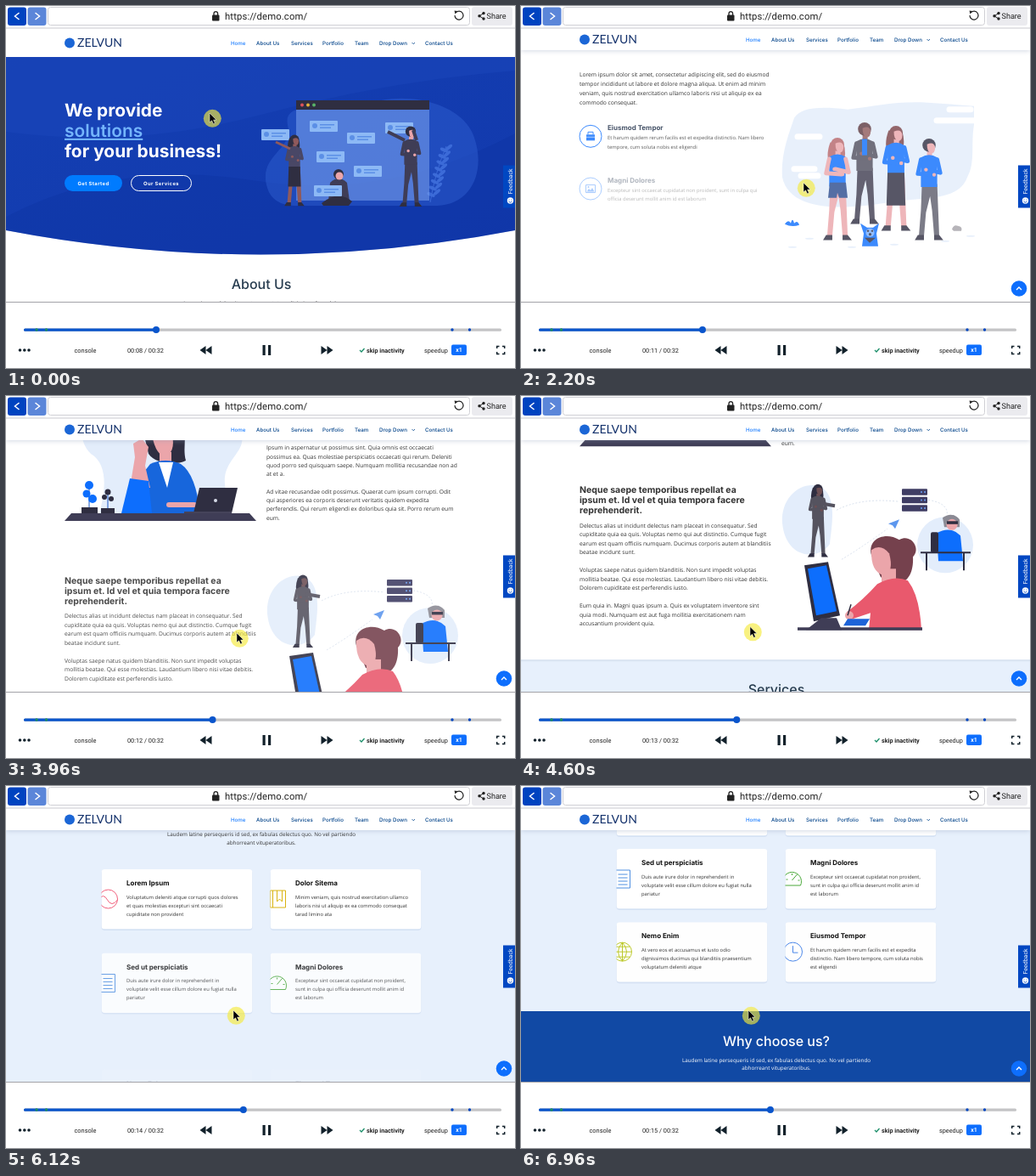
Recreate the animation shown at these times as an HTML page. Size 600 by 426 pixels, loop 7000 ms.

```html
<!DOCTYPE html>
<html lang="en">
<head>
<meta charset="utf-8">
<title>Session replay</title>
<style>
html, body { margin: 0; width: 100%; height: 100%; overflow: hidden; background: #fff; }
svg { display: block; }
body > svg { width: 600px; height: 426px; text-rendering: geometricPrecision; }
</style>
</head>
<body>
<script>
const LOOP = 7000, STEP = 40;
const DARK = '#2f2e41', BLUE = '#0d6efd', DEEP = '#0047c2', SKIN = '#eba5aa', BROWN = '#8f5a5c', PALE = '#e3edfb';

// Shape helpers; text is placed by the middle of its first line
const rect = (x, y, w, h, fill, more = '') => `<rect x="${x}" y="${y}" width="${w}" height="${h}" fill="${fill}" ${more}/>`;
const circle = (x, y, r, fill, more = '') => `<circle cx="${x}" cy="${y}" r="${r}" fill="${fill}" ${more}/>`;
const path = (d, fill, more = '') => `<path d="${d}" fill="${fill}" ${more}/>`;
const line = (d, color, width = 1, more = '') => path(d, 'none', `stroke="${color}" stroke-width="${width}" ${more}`);
const text = (x, y, str, size, { font = 'Open Sans', weight = 400, fill = '#333', anchor = 'start', lead = 10.2, more = '' } = {}) =>
  `<text font-family="'${font}', sans-serif" font-size="${size}" font-weight="${weight}" fill="${fill}" text-anchor="${anchor}" ${more}>` +
  str.split('|').map((s, i) => `<tspan x="${x}" y="${y + size * .35 + i * lead}">${s}</tspan>`).join('') + '</text>';
const head = (x, y, str, size, opt) => text(x, y, str, size, { font: 'Inter', weight: 700, ...opt });
const ui = (x, y, str, size, opt) => text(x, y, str, size, { font: 'Roboto', fill: '#222', ...opt });
const group = (dy, body, id = '') => `<g transform="translate(0 ${dy})"><g id="${id}">${body}</g></g>`;

// Standing figure with folded arms, 100 units tall before scaling
const person = (x, y, h, { hair = DARK, skin = SKIN, top = BLUE, legs = skin, arms = top, skirt, long }) =>
  `<g transform="translate(${x} ${y}) scale(${h / 100})">` +
  (long ? path('M-7 4Q-12 18 -7 25H6Q9 14 6 5Z', hair) : '') +
  path('M-7 44H8L9 70L10 95H5L3 70L1 56L-3 72L-5 95H-10L-8 70Z', legs) +
  path('M-11 94H-5V99H-14ZM5 94H10L14 99H5Z', DARK) + path('M-2 10H3V20H-2Z', skin) +
  path('M-8 18Q0 13 8 18L8 47H-8Z', top) +
  line('M-8 20L-11 34L4 35M8 20L11 33L-2 30', arms, 4, 'stroke-linejoin="round" stroke-linecap="round"') +
  circle(5, 35, 1.8, skin) + circle(-3, 30, 1.8, skin) +
  (skirt ? path(`M-8 44H8L9 ${skirt}H-9Z`, DARK) : '') +
  circle(0, 6, 6.5, hair) + path('M-2 5Q5 2 6 8Q6 14 2 14Q-2 13 -2 5Z', skin) + '</g>';

const hero = () => {
  const note = (x, y) => rect(x, y, 33, 13, '#8db9f5', 'rx="1"') + circle(x + 6, y + 6, 3, '#5b8fe6') +
    rect(x + 12, y + 4, 17, 1.5, '#5b8fe6') + rect(x + 12, y + 7.5, 13, 1.5, '#5b8fe6');
  const leaf = (x, y, turn) => `<ellipse cx="${x}" cy="${y}" rx="5" ry="2" fill="#3c6bd8" transform="rotate(${turn} ${x} ${y})"/>`;
  const leaves = [0, 1, 2, 3, 4, 5, 6, 7].map(i => leaf(501 + i * 2.2, 222 - i * 7.5, 25) + leaf(508 + i * 2, 219 - i * 7.5, -40)).join('');
  return path('M0 0H600V264Q300 321 0 264Z', 'url(#sky)') +
    path('M0 148Q150 168 300 128T600 76V0H0Z', '#1a46bb', 'opacity=".55"') +
    path('M0 248Q130 180 290 205T600 150V264Q300 321 0 264Z', '#0b2f9c', 'opacity=".3"') +
    path('M308 214C296 175 340 170 332 140C326 108 380 126 420 118C470 96 540 115 552 155C566 195 548 236 505 235H340Q314 234 308 214Z', '#2f5fd0', 'opacity=".5"') +
    leaves + line('M500 231Q506 195 519 165', '#3c6bd8') +
    rect(342, 111, 157, 118, '#7da2ee', 'opacity=".55"') + rect(342, 111, 157, 11, DARK) +
    circle(349, 116.5, 2, '#e0525a') + circle(356, 116.5, 2, '#e6b23a') + circle(363, 116.5, 2, '#58b368') +
    [[301, 145], [358, 135], [402, 149], [447, 137], [366, 171], [410, 188]].map(p => note(...p)).join('') +
    person(340, 152, 84, { skin: BROWN, top: '#494766', skirt: 72, long: true }) + line('M335 168L318 160', BROWN, 3) +
    person(477, 142, 95, { top: '#3f3d56', legs: '#3f3d56' }) + line('M470 158L450 148M484 158L480 146', '#3f3d56', 4) +
    path('M382 208Q392 198 402 208L405 230H380Z', '#3f3d56') +
    path('M372 232Q392 216 408 230L404 235H374Z', DARK) + circle(392, 198, 6, DARK) + circle(393, 200, 4.5, SKIN) +
    note(363, 211) +
    head(69, 122.5, 'We provide', 20.9, { fill: '#fff' }) +
    head(69, 146.5, 'solutions', 20.9, { weight: 600, fill: '#74b5fc', more: 'text-decoration="underline"' }) +
    head(69, 170.5, 'for your business!', 20.9, { fill: '#fff' }) +
    rect(69, 199, 68, 19, '#007bff', 'rx="9.5"') + rect(147.5, 199.5, 71, 18, 'none', 'rx="9" stroke="#fff"') +
    head(103, 208.5, 'Get Started', 5.9, { fill: '#fff', anchor: 'middle', more: 'letter-spacing=".4"' }) +
    head(183, 208.5, 'Our Services', 5.9, { fill: '#fff', anchor: 'middle', more: 'letter-spacing=".4"' });
};

const title = (y, str, fill = '#283d50') => head(301, y, str, 16, { weight: 500, fill, anchor: 'middle' });
const lead = (y, str, fill = '#333') => text(301, y, str, 6.3, { fill, anchor: 'middle', lead: 9.5 });
const LAUDEM = 'Laudem latine persequeris id sed, ex fabulas delectus quo. No vel partiendo|abhorreant vituperatoribus.';

const feature = (y, name, body, icon) =>
  circle(82, y + 10, 13, '#fff', `stroke="${BLUE}"`) + `<g transform="translate(82 ${y + 10})">${icon}</g>` +
  head(102, y, name, 8, { fill: '#1b2b45' }) + text(102, y + 12, body, 5.86);

const ICONS = {
  bag: path('M-5 -2H5V5H-5Z', BLUE) + line('M-3 -2V-5H3V-2', BLUE) + line('M-5 1H5', '#fff', .6),
  image: line('M-5.5 -4.5H5.5V4.5H-5.5Z', BLUE) + path('M-4.5 3.5L-2 0L0 2L2 -1L4.5 3.5Z', BLUE) + circle(-2.5, -2, 1, BLUE),
  chart: line('M-6 -5V5H6', BLUE) + line('M-3 4V0M0 4V-4M3 4V-2M5 4V-5', BLUE, 1.6)
};

const team = () =>
  path('M308 168C306 140 316 116 322 98C330 86 350 84 385 88C420 84 440 78 480 80L534 84V106C530 130 536 150 526 168C515 198 470 190 430 198C390 204 318 212 308 168Z', PALE) +
  line('M326 120H352M322 158H346M490 101H534M505 88H530M330 166H350', '#fff', 7, 'stroke-linecap="round"') +
  person(373, 122, 121, { hair: '#b5666b', legs: SKIN, arms: SKIN, long: true }) + path('M364 174H383L385 192H375L373 186L372 192H362Z', '#2b4c8f') +
  person(405, 104, 120, { hair: '#5d3a42', skin: BROWN, top: '#4f4e5e', legs: '#3f3d50' }) + path('M402 123H408V142H402Z', BLUE) +
  person(442, 108, 124, { hair: '#7a4248', skirt: 75, long: true }) +
  person(481, 123, 120, { legs: '#5c5b6b' }) +
  path('M402 249L404 234L400 222L408 227H415L422 222L419 234L421 249Z', BLUE) + circle(411.5, 233, 5, '#78aefc') +
  circle(409, 231, 1.2, DARK) + circle(414, 231, 1.2, DARK) + circle(411.5, 235, 1.6, DARK) + path('M405 239H418L411 245Z', DARK) +
  path('M311 223Q315 217 318 222Q320 214 322 222Q326 218 328 224Q319 227 311 223Z', BLUE) +
  path('M508 229Q510 223 515 225Q521 226 519 231H510Z', '#a5a3a9') +
  [[340, 240], [390, 250], [440, 247], [500, 243], [530, 237], [320, 250]].map(([x, y]) => `<ellipse cx="${x}" cy="${y}" rx="5" ry="1" fill="${PALE}"/>`).join('');

const desk = () =>
  path('M88 40C84 20 130 28 165 30C200 18 268 22 278 45C282 65 262 72 258 95C256 115 270 138 250 138H110C118 110 120 80 100 68C92 60 90 52 88 40Z', PALE) +
  path('M163 47C160 26 186 20 203 30C217 42 207 58 212 76C200 82 176 80 168 68Z', DARK) +
  path('M172 42Q187 34 196 46Q200 66 187 72Q174 66 172 42Z', SKIN) + path('M181 66H195V86H181Z', SKIN) +
  path('M170 80Q188 72 206 80Q224 92 229 139H148L156 98Z', '#1766dc') + path('M180 78H197L190 108Z', '#fff') +
  path('M146 108L152 72L150 56L160 50L168 60L164 82L170 108Z', SKIN) + path('M146 97L168 100L172 138H136Z', BLUE) +
  line('M192 128H222', SKIN, 6, 'stroke-linecap="round"') +
  path('M228 108H273L266 138H221Z', DARK) + path('M210 136H266V140H210Z', '#45435a') + circle(247, 123, 2, '#d7dbe8') +
  path('M89 131H108V140H89ZM112 132H128V140H112Z', DARK) +
  line('M98 131V106M120 132V115', '#1b56c4') + circle(98, 105, 5, BLUE) + circle(95, 115, 4.5, BLUE) + circle(102, 121, 5, BLUE) +
  circle(120, 113, 3.5, DARK) + circle(116, 119, 3, DARK) + circle(124, 121, 3, DARK) +
  path('M77 138H287L295 147H69Z', '#3f3d56');

const network = () =>
  path('M308 255C306 225 330 205 352 212C374 222 366 260 364 280C350 300 312 298 308 255Z', PALE) +
  person(350, 210, 86, { skin: '#6d5055', top: '#55535f', legs: '#55535f', long: true }) + line('M353 232L370 235', '#55535f', 4) +
  line('M372 240Q400 225 446 230M480 228Q505 232 502 247M378 298Q400 285 432 262', '#c9d4e6', .7, 'stroke-dasharray="2 2"') +
  [215, 224.5, 234].map(y => rect(449, y, 30, 7.5, '#3f3d63', 'rx="1"') + circle(472, y + 3.7, 1, '#6ba0f7') + circle(476, y + 3.7, 1, '#6ba0f7')).join('') +
  path('M433 256L446 251L441 262L438 258Z', '#5d97ee') +
  circle(500, 281, 33, PALE) + path('M490 267Q506 258 518 270L521 300H492Z', BLUE) +
  path('M497 249Q508 241 517 251V260H499Z', '#8b8a94') + circle(508, 257, 6.5, SKIN) + rect(502, 253, 13, 3.5, DARK) +
  rect(483, 266, 9, 24, DARK, 'rx="2"') + line('M471 290H530M478 291V311M522 291V311', DARK, 2);

const artist = () =>
  path('M334 104L362 100L376 163L345 170Z', DARK) + path('M338 108L360 104L372 158L348 163Z', BLUE) +
  path('M354 166H372L378 180H336Z', '#3f3d56') +
  path('M413 92C408 72 430 64 446 74C460 66 472 85 462 94C463 112 456 124 446 124L424 118Z', '#75414d') +
  path('M413 86Q424 78 434 90Q440 112 428 116Q412 112 413 86Z', SKIN) + path('M425 108H442V128H425Z', SKIN) +
  path('M420 126Q440 115 456 122Q470 140 472 180H410L412 160L388 168L384 159Q404 144 420 126Z', '#e9596d') +
  circle(387, 163, 5, SKIN) + line('M385 163L389 150', DARK, 1.5) +
  path('M385 167H411L406 175H380Z', '#1d63d8') + rect(326, 177, 147, 3.5, '#3f3d56');

const CARD_ICONS = [
  ['#f0607c', 'M19 35A11 11 0 1 1 -3 35A11 11 0 1 1 19 35M-3 36Q2 27 7 36T19 36'],
  ['#d9b310', 'M0 25H18V45H0ZM8 25V38L11 35L14 38V25M3 25V45'],
  ['#4f8fe0', 'M-3 25H16V46H-3ZM2 30H13M2 34H13M2 38H13M2 42H13'],
  ['#4aa83a', 'M-2 43A11 11 0 1 1 18 43ZM8 37L14 30M1 36H3M8 29V31M15 37H17'],
  ['#bcc82a', 'M18 35A11 11 0 1 1 -4 35A11 11 0 1 1 18 35M-4 35H18M7 24V46M-2 29H16M-2 41H16M7 24Q-3 35 7 46Q17 35 7 24'],
  ['#4a86e8', 'M20 35A11 11 0 1 1 -2 35A11 11 0 1 1 20 35M9 28V36H15']
];
const card = (i, name, body) => {
  const x = i % 2 ? 311.5 : 112.5, y = 98 + (i >> 1) * 86;
  return rect(x, y + 1, 178, 71, '#9fb8dc', 'rx="4" opacity=".25"') +
    `<svg x="${x}" y="${y}" width="178" height="70.5">` + rect(0, 0, 178, 70.5, '#fff', 'rx="4"') +
    line(CARD_ICONS[i][1], CARD_ICONS[i][0]) +
    head(29.5, 16.5, name, 8, { fill: '#111' }) + text(29.5, 32.5, body, 5.86) + '</svg>';
};

const page = () =>
  group(0, hero() + title(327, 'About Us') + lead(350, 'Lorem ipsum dolor sit amet, consectetur adipiscing elit, sed do|eiusmod tempor incididunt ut labore.')) +
  group(320, text(69, 77, 'Lorem ipsum dolor sit amet, consectetur adipiscing elit, sed do eiusmod|tempor incididunt ut labore et dolore magna aliqua. Ut enim ad minim|veniam, quis nostrud exercitation ullamco laboris nisi ut aliquip ex ea|commodo consequat.', 6.7, { lead: 11 })) +
  group(320, team(), 'team') +
  group(320, feature(132, 'Eiusmod Tempor', 'Et harum quidem rerum facilis est et expedita distinctio. Nam libero|tempore, cum soluta nobis est eligendi', ICONS.bag), 'feat1') +
  group(320, feature(176, 'Magni Dolores', 'Excepteur sint occaecat cupidatat non proident, sunt in culpa qui|officia deserunt mollit anim id est laborum', ICONS.image), 'feat2') +
  group(320, feature(221, 'Dolor Sitema', 'Minim veniam, quis nostrud exercitation ullamco laboris nisi ut aliquip|ex ea commodo consequat tarad limino ata', ICONS.chart), 'feat3') +
  group(583, desk() +
    head(307, 30, 'Voluptatem dignissimos provident quasi|corporis voluptates sit assumenda.', 10.5, { lead: 12 }) +
    text(307, 61, 'Ipsum in aspernatur ut possimus sint. Quia omnis est occaecati|possimus ea. Quas molestiae perspiciatis occaecati qui rerum. Deleniti|quod porro sed quisquam saepe. Numquam mollitia recusandae non ad|at et a.||Ad vitae recusandae odit possimus. Quaerat cum ipsum corrupti. Odit|qui asperiores ea corporis deserunt veritatis quidem expedita|perferendis. Qui rerum eligendi ex doloribus quia sit. Porro rerum eum|eum.', 6.7, { lead: 10.3 }), 'desk') +
  group(565, network() + group(201, artist()) +
    head(69, 216, 'Neque saepe temporibus repellat ea|ipsum et. Id vel et quia tempora facere|reprehenderit.', 10.5, { lead: 12 }) +
    text(69, 258, 'Delectus alias ut incidunt delectus nam placeat in consequatur. Sed|cupiditate quia ea quis. Voluptas nemo qui aut distinctio. Cumque fugit|earum est quam officiis numquam. Ducimus corporis autem at blanditiis|beatae incidunt sunt.||Voluptas saepe natus quidem blanditiis. Non sunt impedit voluptas|mollitia beatae. Qui esse molestias. Laudantium libero nisi vitae debitis.|Dolorem cupiditate est perferendis iusto.||Eum quia in. Magni quas ipsum a. Quis ex voluptatem inventore sint|quia modi. Numquam est aut fuga mollitia exercitationem nam|accusantium provident quia.', 6.7, { lead: 10.5 }), 'network') +
  group(766, rect(0, 215, 600, 375, '#e7f0fc') + rect(0, 215, 600, 2, '#d9e3f1') + title(250, 'Services') + lead(272, LAUDEM)) +
  group(981, card(0, 'Lorem Ipsum', 'Voluptatum deleniti atque corrupti quos dolores|et quas molestias excepturi sint occaecati|cupiditate non provident') +
    card(1, 'Dolor Sitema', 'Minim veniam, quis nostrud exercitation ullamco|laboris nisi ut aliquip ex ea commodo consequat|tarad limino ata'), 'row1') +
  group(981, card(2, 'Sed ut perspiciatis', 'Duis aute irure dolor in reprehenderit in|voluptate velit esse cillum dolore eu fugiat nulla|pariatur') +
    card(3, 'Magni Dolores', 'Excepteur sint occaecat cupidatat non proident,|sunt in culpa qui officia deserunt mollit anim id|est laborum'), 'row2') +
  group(981, card(4, 'Nemo Enim', 'At vero eos et accusamus et iusto odio|dignissimos ducimus qui blanditiis praesentium|voluptatum deleniti atque') +
    card(5, 'Eiusmod Tempor', 'Et harum quidem rerum facilis est et expedita|distinctio. Nam libero tempore, cum soluta nobis|est eligendi'), 'row3') +
  group(1091, rect(0, 265, 600, 200, '#1149a4') + title(300, 'Why choose us?', '#fff') + lead(322.5, LAUDEM, '#fff'));

const NAV = [[265, 'Home'], [295, 'About Us'], [336, 'Services'], [373, 'Portfolio'], [411, 'Team'], [440, 'Drop Down'], [494, 'Contact Us']];
const header = () =>
  rect(0, -30, 600, 30, '#8a9ab5', 'id="shade" filter="url(#soft)"') + rect(0, -40, 600, 40, '#fff') +
  '<g id="nav">' + circle(75, 0, 6, '#1b66d6') + text(84, 0, 'ZELVUN', 14, { font: 'Lato', fill: '#12306b' }) +
  NAV.map(([x, s], i) => head(x, 0, s, 6.2, { weight: 500, fill: i ? '#004289' : '#1b7dff' })).join('') +
  line('M478.5 -.5L480.3 1.3L482 -.5', '#004289', .8) + '</g>';

const topBar = () =>
  rect(0, 0, 600, 26, '#fff') + rect(2, 1.5, 22, 21.5, '#0043c0', 'rx="3"') + rect(25.5, 1.5, 22, 21.5, '#5b86d9', 'rx="3"') +
  line('M15.5 8L10.5 12L15.5 16M34.5 8L39.5 12L34.5 16', '#fff', 1.5) +
  rect(49.5, 1.5, 497, 21, '#fff', 'rx="3" stroke="#cfcfd4"') + rect(243, 10.5, 8.5, 7, '#222', 'rx="1"') + line('M245 11V9A2.3 2.3 0 0 1 249.6 9V11', '#222', 1.3) +
  ui(258, 12, 'https://demo.com/', 11.3, { more: 'letter-spacing=".12"' }) +
  line('M530.3 7.7A5 5 0 1 1 529 11', '#222', 1.2) + path('M528.5 5.5L532.5 6L529.5 9.5Z', '#222') +
  rect(549, 1, 48, 22, '#ebebef', 'rx="3"') + line('M563 8.5L558 11.8L563 15', '#222') +
  circle(558, 11.8, 1.7, '#222') + circle(563, 8.5, 1.7, '#222') + circle(563, 15, 1.7, '#222') + ui(566.5, 12, 'Share', 9.1) +
  rect(0, 25.5, 600, 1, '#c9c9cf');

const controls = () =>
  rect(0, 348, 600, 78, '#fff') + rect(0, 348, 600, 1, '#a3a3a8') +
  rect(21, 379.5, 563, 3.2, '#c4c4c6', 'rx="1.5"') + rect(21, 379.5, 0, 3.2, '#0a55cc', 'rx="1.5" id="played"') +
  circle(36, 381, 1.7, '#1f8f5f') + circle(47.5, 381, 1.7, '#1f8f5f') + circle(526, 381, 1.7, DEEP) + circle(546.5, 381, 1.7, DEEP) +
  circle(0, 381, 4, '#0a55cc', 'id="thumb"') +
  [16.5, 21.8, 27].map(x => circle(x, 405, 1.8, '#12212b')).join('') +
  ui(80.5, 405, 'console', 7.4) + '<g id="clock">' + ui(143, 405, '00:08 / 00:32', 7.3) + '</g>' +
  path('M228.5 405L235.5 400V410ZM235.5 405L242.5 400V410ZM385.5 405L378.5 400V410ZM378.5 405L371.5 400V410ZM302.5 399H305.7V411H302.5ZM309 399H312.2V411H309Z', '#12212b') +
  line('M417 405L419 407L422.5 403', '#1c8f6a', 1.3) + ui(425, 405, 'skip inactivity', 7.2, { weight: 700 }) +
  ui(493, 405, 'speedup', 7.3) + rect(525, 398.5, 18, 12.5, BLUE, 'rx="2"') + ui(534, 405, 'x1', 7, { weight: 700, fill: '#fff', anchor: 'middle' }) +
  line('M578.7 403V400.5H581.5M585 400.5H587.7V403M587.7 407V409.5H585M581.5 409.5H578.7V407', '#12212b', 1.5);

const widgets = () =>
  `<g id="up">${circle(587, 332.5, 9.3, BLUE)}${line('M584 334L587 331L590 334', '#fff', 1.4)}</g>` +
  rect(586, 187.5, 14, 50, DEEP) + `<g transform="translate(594.5 221.5) rotate(-90)">${ui(0, 0, 'Feedback', 7, { fill: '#fff' })}</g>` +
  circle(594.5, 229, 3.7, '#fff') + line('M593 227.5V228.5M596 227.5V228.5M592.5 230Q594.5 232.5 596.5 230', DEEP, .8) +
  '<g id="cursor">' + circle(3.3, 6.3, 10.5, '#f4ea3c', 'opacity=".65"') + path('M0 0V11L2.6 8.8L4.4 12.8L6.4 12L4.6 8H8Z', '#000', 'stroke="#fff" stroke-width=".5"') + '</g>';

document.body.innerHTML = `<svg viewBox="0 0 600 426"><defs>
<linearGradient id="sky" x1="0" y1="0" x2="1" y2="1"><stop stop-color="#1440b3"/><stop offset="1" stop-color="#1239ad"/></linearGradient>
<filter id="soft" x="-5%" y="-50%" width="110%" height="200%"><feGaussianBlur stdDeviation="3"/></filter>
<clipPath id="view"><rect y="26" width="600" height="322"/></clipPath></defs>
<rect width="600" height="426" fill="#fff"/>
<g clip-path="url(#view)"><g id="page">${page()}</g><g id="header">${header()}</g></g>
${topBar()}${controls()}${widgets()}</svg>`;

const $ = id => document.getElementById(id);
const clock = $('clock').querySelector('tspan');
const move = (id, x, y) => $(id).setAttribute('transform', `translate(${x} ${y})`);
const clamp = v => Math.min(1, Math.max(0, v));

// Rows are [time, value, ...], joined by steady motion
const SCROLL = [[0, 0], [1520, 0], [2100, 310], [2200, 316], [3000, 320], [3960, 583], [4340, 632], [5240, 766], [5560, 817], [5900, 903], [6120, 981], [6560, 1091]];
const POINTER = [[0, 240, 126], [1500, 333, 208], [2200, 333, 208], [3000, 279, 238], [3960, 272, 279], [5240, 268, 264]];
function track(keys, t) {
  const i = keys.findIndex(k => k[0] > t);
  if (i < 0) return keys[keys.length - 1].slice(1);
  const a = keys[i - 1], b = keys[i], p = (t - a[0]) / (b[0] - a[0]);
  return a.slice(1).map((v, j) => v + (b[j + 1] - v) * p);
}

// The CSS "ease" curve, cubic-bezier(.25, .1, .25, 1)
function ease(x) {
  let lo = 0, hi = 1;
  const bezier = (u, p, q) => 3 * u * (1 - u) * ((1 - u) * p + u * q) + u ** 3;
  for (let i = 0; i < 16; i++) {
    const mid = (lo + hi) / 2;
    if (bezier(mid, .25, .25) < x) lo = mid; else hi = mid;
  }
  return bezier(hi, .1, 1);
}

// One-second fade-up reveals as sections scroll into view: id, start, rise
const REVEALS = [['team', 1700, 150], ['feat1', 1700, 37], ['feat2', 1980, 38], ['feat3', 2200, 38],
  ['desk', 2080, 120], ['network', 3360, 165], ['row1', 5000, 70], ['row2', 5600, 70], ['row3', 6020, 70]];

function frame(now) {
  const t = Math.floor(now % LOOP / STEP) * STEP;
  const [s] = track(SCROLL, t);
  move('page', 0, -s);
  for (const [id, start, rise] of REVEALS) {
    const shown = ease(clamp((t - start) / 1000));
    move(id, 0, rise * (1 - shown));
    $(id).setAttribute('opacity', shown);
  }
  const shrink = clamp(s / 60);
  move('header', 0, 60 - 8 * shrink);
  move('nav', 0, -16.5 + 4 * shrink);
  $('shade').setAttribute('opacity', .5 * shrink);
  $('up').setAttribute('opacity', clamp(s / 60 - .5));
  move('cursor', ...track(POINTER, t));
  const x = 177 + t * .0168;
  $('played').setAttribute('width', x - 21);
  $('thumb').setAttribute('cx', x);
  const sec = Math.floor((x - 21) / 563 * 32.4);
  clock.textContent = `00:${String(sec).padStart(2, '0')} / 00:32`;
  requestAnimationFrame(() => frame(performance.now() - begin));
}
const begin = performance.now();
frame(0);
</script>
</body>
</html>
```
